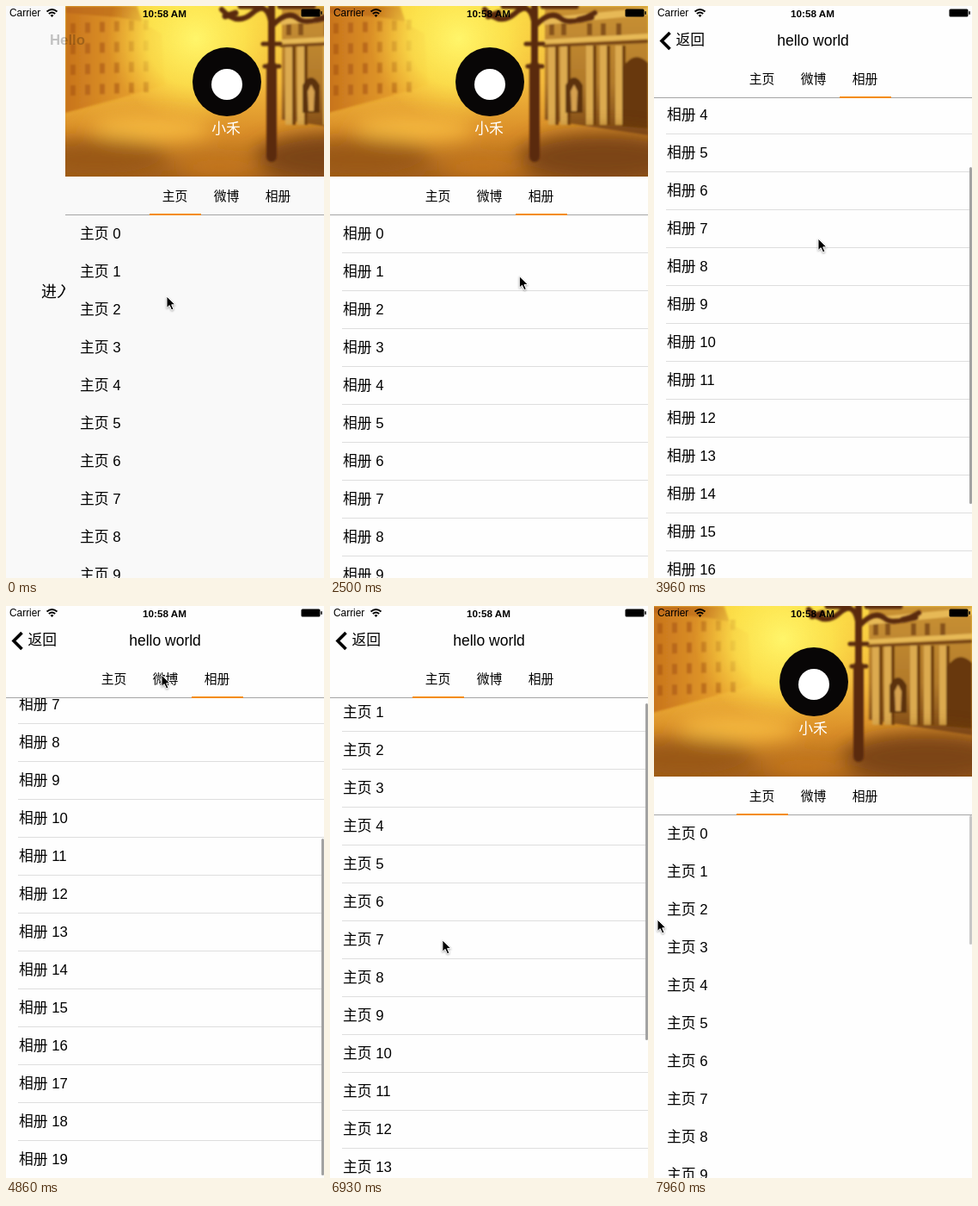
An HTML page that plays this animation: 370 by 664 pixels, repeating every 8 s.

```html
<!DOCTYPE html>
<html lang="zh-CN">
<head>
<meta charset="utf-8">
<title>Collapsing profile header</title>
<style>
html, body { margin: 0; width: 100%; height: 100%; overflow: hidden; background: #f9f9f9; }
body { font: 16.8px/44px "Liberation Sans", "Noto Sans CJK SC", "Noto Sans CJK", sans-serif; color: #000; }
#stage { position: relative; width: 370px; height: 664px; overflow: hidden; background: #f9f9f9; }
#stage div, #stage svg, #stage span { position: absolute; white-space: nowrap; }
#enter { left: 41px; top: 310px; font-size: 18px; }
#hello { left: 51px; top: 18px; font-weight: bold; color: rgba(0,0,0,.22); }
#page { left: 0; top: 0; width: 370px; height: 664px; }
#paper { left: -2px; top: 0; width: 372px; height: 664px; }
#list { left: 0; top: 243px; width: 370px; }
#list div { left: 14px; right: 0; height: 43px; padding-left: 1px; border-bottom: 1px solid transparent; }
#list.ruled div { border-color: #dedede; }
#cover { left: -2px; top: 0; width: 372px; overflow: hidden; background: #b9741f; }
#photo { left: 0; top: 0; }
#who { left: 0; top: 0; width: 370px; }
#avatar { left: 145.5px; top: 48px; width: 80px; height: 80px; border-radius: 50%; background: #080606; }
#mark { left: 22px; top: 25px; width: 36px; height: 36px; border-radius: 50%; background: #fff; }
#nick { left: 0; width: 370px; top: 121px; text-align: center; color: #fff; }
#tabs { left: -2px; top: 198px; width: 372px; height: 44px; border-bottom: 1px solid #a5a5a5; font-size: 14.8px; }
#tabs span { width: 60px; text-align: center; top: 1px; }
#line { top: 43px; width: 60px; height: 2px; background: #f48c0a; }
#bar { left: 367px; width: 3px; border-radius: 2px; background: #a2a2a2; }
#nav { left: 0; top: 0; width: 370px; height: 62px; background: #fefefe; }
#nav svg { left: 5px; top: 29px; }
#back { left: 25.5px; top: 18px; }
#title { left: 0; width: 370px; top: 18px; text-align: center; font-size: 17.5px; }
#status { left: 0; top: 0; width: 370px; height: 17px; font-size: 11.9px; line-height: 17px; }
#clock { left: 0; width: 369px; text-align: center; font-weight: bold; font-size: 11.7px; }
#press { width: 20px; height: 20px; margin: -10.5px 0 0 -9.5px; border: 1px solid #000; border-radius: 50%; left: 0; top: 0; }
#cursor { left: -1px; top: -1px; filter: drop-shadow(0 1px 1px rgba(0,0,0,.35)); }
</style>
</head>
<body>
<div id="stage">
  <div id="enter">进入个人主页</div>
  <div id="page">
    <div id="paper"></div>
    <div id="list"></div>
    <div id="bar"></div>
    <div id="cover">
      <svg id="photo" width="372" height="198">
        <defs>
          <linearGradient id="base" x2="0" y2="1">
            <stop offset="0" stop-color="#fbd944"/><stop offset=".45" stop-color="#f3b93c"/>
            <stop offset=".75" stop-color="#d98d28"/><stop offset="1" stop-color="#a4601a"/>
          </linearGradient>
          <linearGradient id="town">
            <stop offset="0" stop-color="#c8741c"/><stop offset="1" stop-color="#f1b134"/>
          </linearGradient>
          <linearGradient id="stone" x2="0" y2="1">
            <stop offset="0" stop-color="#c99234"/><stop offset=".6" stop-color="#b27a2b"/>
            <stop offset="1" stop-color="#7d4815"/>
          </linearGradient>
          <radialGradient id="sun">
            <stop offset="0" stop-color="#fff56a"/><stop offset=".55" stop-color="#fde64f" stop-opacity=".75"/>
            <stop offset="1" stop-color="#fbd040" stop-opacity="0"/>
          </radialGradient>
          <filter id="soft" x="-20%" y="-20%" width="140%" height="140%"><feGaussianBlur stdDeviation="1.2"/></filter>
          <filter id="haze" x="-40%" y="-40%" width="180%" height="180%"><feGaussianBlur stdDeviation="11"/></filter>
        </defs>
        <rect width="372" height="198" fill="url(#base)"/>
        <g filter="url(#soft)">
          <path d="M0 0H82L90 20L112 32L116 92L60 108L0 124Z" fill="url(#town)"/>
          <path d="M0 0H84L90 18L60 13L0 8Z" fill="#b76419" opacity=".6"/>
          <g id="windows" fill="#a95716" opacity=".6"></g>
          <path d="M252 0H372V150L252 132Z" fill="url(#stone)"/>
          <g id="columns"></g>
          <path d="M250 14L372 2V10L250 22ZM250 39L372 32V38L250 44Z" fill="#e7b957"/>
          <path d="M250 45L372 39V43L250 48Z" fill="#774415"/>
          <path d="M276 124V92Q286 74 296 92V124Z" fill="#5c3010"/>
          <path d="M283 122L282 99L286 91L290 99L289 122Z" fill="#d6a150"/>
          <path d="M342 140V72Q356 50 372 66V142Z" fill="#673811"/>
        </g>
        <ellipse cx="152" cy="38" rx="104" ry="100" fill="url(#sun)"/>
        <g filter="url(#haze)">
          <ellipse cx="35" cy="178" rx="85" ry="24" fill="#9a5816"/>
          <ellipse cx="320" cy="176" rx="100" ry="30" fill="#7b4514"/>
          <ellipse cx="100" cy="142" rx="70" ry="14" fill="#f5b93f"/>
          <ellipse cx="180" cy="187" rx="50" ry="10" fill="#ca7a1e"/>
        </g>
        <g filter="url(#soft)" fill="none" stroke="#5a2c10" stroke-linecap="round">
          <path d="M240 0V160" stroke-width="8"/>
          <path d="M240 70V175" stroke-width="12"/>
          <path d="M182 4Q200 24 218 8T240 24Q258 4 270 14T310 8" stroke-width="6"/>
          <path d="M204 0H228M250 0H288M186 12L198 8M292 16L306 13" stroke-width="7"/>
          <path d="M230 44H250M232 70H249" stroke-width="5"/>
        </g>
      </svg>
    </div>
    <div id="who">
      <div id="avatar"><div id="mark"></div></div>
      <div id="nick">小禾</div>
    </div>
    <div id="tabs"><div id="line"></div></div>
    <div id="nav">
      <svg width="18" height="24"><path d="M13.500 2L4 11.500L13.500 21" fill="none" stroke="#000" stroke-width="3.600"/></svg>
      <div id="back">返回</div>
      <div id="title">hello world</div>
    </div>
  </div>
  <div id="hello">Hello</div>
  <div id="status">
    <span style="left:4px">Carrier</span>
    <svg style="left:46px;top:2px" width="15" height="12" fill="none" stroke="#000" stroke-width="1.900">
      <path d="M1.500 4.500Q7.500 -.5 13.500 4.500M3.800 7Q7.500 4 11.200 7"/>
      <path d="M5.500 8.700Q7.500 7.200 9.500 8.700L7.500 11Z" fill="#000" stroke="none"/>
    </svg>
    <div id="clock">10:58 AM</div>
    <svg style="left:343px;top:3px" width="26" height="11">
      <rect x=".5" y=".5" width="22" height="9" rx="1.500"/><rect x="23.300" y="3" width="1.500" height="4" rx=".7"/>
    </svg>
  </div>
  <div id="press"></div>
  <svg id="cursor" width="15" height="20"><path d="M1 1V14.500L4.200 11.600L6.600 17L9 16L6.700 10.800H11Z" stroke="#fff" stroke-width="1"/></svg>
</div>
<script>
const LOOP = 8000, FOLD = 136;
const NAMES = ['主页', '微博', '相册'];
const $ = id => document.getElementById(id);

// Bursts of screen updates: start, end, number of steps
const BURSTS = [[150, 730, 5], [1180, 2200, 8], [2350, 3380, 8], [3520, 4560, 8],
  [4710, 5450, 6], [5750, 6780, 8], [6930, 7960, 8]];

const SLIDE = [[0, 71], [150, 22], [295, 6], [440, 1], [585, 0]];
const SCROLL = [[2790, 0], [3380, 64], [3520, 100], [3670, 160], [3820, 250], [4115, 380], [4410, 445], [4560, 458],
  [5005, 458], [5006, 136], [5890, 136], [6044, 215], [6191, 345], [6339, 458], [6486, 405], [6633, 330],
  [6780, 250], [6930, 185], [7077, 105], [7224, 40], [7371, 9], [7518, 0]];
const TAB = [[1617, 0], [1763, 1], [2054, 1], [2200, 2], [4858, 2], [5006, 1], [5154, 1], [5302, 0]];
const POINTER = [[0, 187, 337], [585, 187, 308], [1180, 187, 308], [1617, 186, 227], [1763, 186, 227],
  [2054, 246, 227], [2200, 246, 227], [2790, 195, 399], [3380, 194, 335], [3670, 192, 240], [4260, 190, 300],
  [4710, 186, 120], [4858, 181, 80], [5006, 181, 80], [5302, 126, 80], [5450, 126, 80], [5890, 142, 420],
  [6191, 142, 240], [6339, 142, 195], [6486, 142, 248], [6780, 140, 400], [7371, 104, 352], [7960, 4, 364]];
const PRESSES = [[1700, 1800], [2150, 2300], [2780, 3700], [4990, 5100], [5290, 5400], [5890, 6200], [6400, 6800]];
const BAR = [[295, 0], [585, 1], [1300, 1], [1617, 0], [2640, 0], [2790, 1], [4860, 1], [5006, 0],
  [5750, 0], [5890, 1], [7600, 1], [7960, .6]];

function at(keys, t, col = 1) {
  const i = keys.findIndex(k => k[0] > t);
  if (i === 0) return keys[0][col];
  if (i < 0) return keys[keys.length - 1][col];
  const a = keys[i - 1], b = keys[i];
  return a[col] + (b[col] - a[col]) * (t - a[0]) / (b[0] - a[0]);
}

function sample(t) {
  let s = 0;
  for (const [from, to, n] of BURSTS) {
    if (t < from) break;
    const step = (to - from) / (n - 1);
    s = from + step * Math.min(n - 1, Math.floor((t - from + 8) / step));
  }
  return s;
}

const rows = Array.from({ length: 20 }, (_, i) => {
  const row = document.createElement('div');
  row.style.top = i * 44 + 'px';
  $('list').append(row);
  return row;
});
NAMES.forEach((name, i) => {
  const tab = document.createElement('span');
  tab.textContent = name;
  tab.style.left = 97.5 + i * 60 + 'px';
  $('tabs').append(tab);
});

const rect = (x, y, w, h, fill) =>
  `<rect x="${x}" y="${y}" width="${w}" height="${h}"${fill ? ` fill="${fill}"` : ''}/>`;
let art = '';
for (let r = 0; r < 4; r++) for (let c = 0; c < 6; c++) art += rect(6 + c * 17, 20 + r * 24 - c * .8, 6, 12);
$('windows').innerHTML = art;
art = '';
for (const x of [256, 270, 300, 316, 334]) {
  art += rect(x, 46, 9, 92, '#dcaa50') + rect(x + 8, 46, 4, 92, '#71400f') + rect(x + 1, 20, 6, 14, '#87531c');
}
$('columns').innerHTML = art;

let shown = -1;
function fill(tab) {
  if (tab === shown) return;
  shown = tab;
  rows.forEach((row, i) => { row.textContent = NAMES[tab] + ' ' + i; });
}

const move = (id, x, y) => { $(id).style.transform = `translate(${x}px,${y}px)`; };

function draw(now) {
  const t = sample(now % LOOP);
  const off = Math.round(at(SCROLL, t)), fold = Math.min(off, FOLD);
  const tab = at(TAB, t), paper = t < 440 ? '#f9f9f9' : '#fefefe';

  move('page', at(SLIDE, t), 0);
  $('paper').style.background = $('tabs').style.background = paper;
  $('hello').style.opacity = t < 150 ? 1 : 0;

  fill(Math.round(tab));
  move('list', 0, -off);
  $('list').className = t > 1200 && t < 7150 ? 'ruled' : '';

  $('cover').style.height = 198 - fold + 'px';
  move('photo', 0, -fold / 2);
  move('who', 0, -fold);
  move('tabs', 0, -fold);
  $('line').style.left = 97.5 + tab * 60 + 'px';
  $('nav').style.opacity = fold / FOLD;

  const bar = $('bar').style;
  bar.top = Math.max(243 - fold, 270 - .574 * (458 - off)) + 'px';
  bar.height = 150 + 1.405 * fold + .0027 * fold * fold + 'px';
  bar.opacity = at(BAR, t);

  const x = at(POINTER, t), y = at(POINTER, t, 2);
  move('cursor', x, y);
  move('press', x, y);
  $('press').style.opacity = PRESSES.some(([a, b]) => t >= a && t < b) || Math.abs(t - 6486) < 8 ? 1 : 0;
}

let start;
function tick(now) {
  start ??= now;
  draw(now - start);
  requestAnimationFrame(tick);
}
draw(0);
requestAnimationFrame(tick);
</script>
</body>
</html>
```
